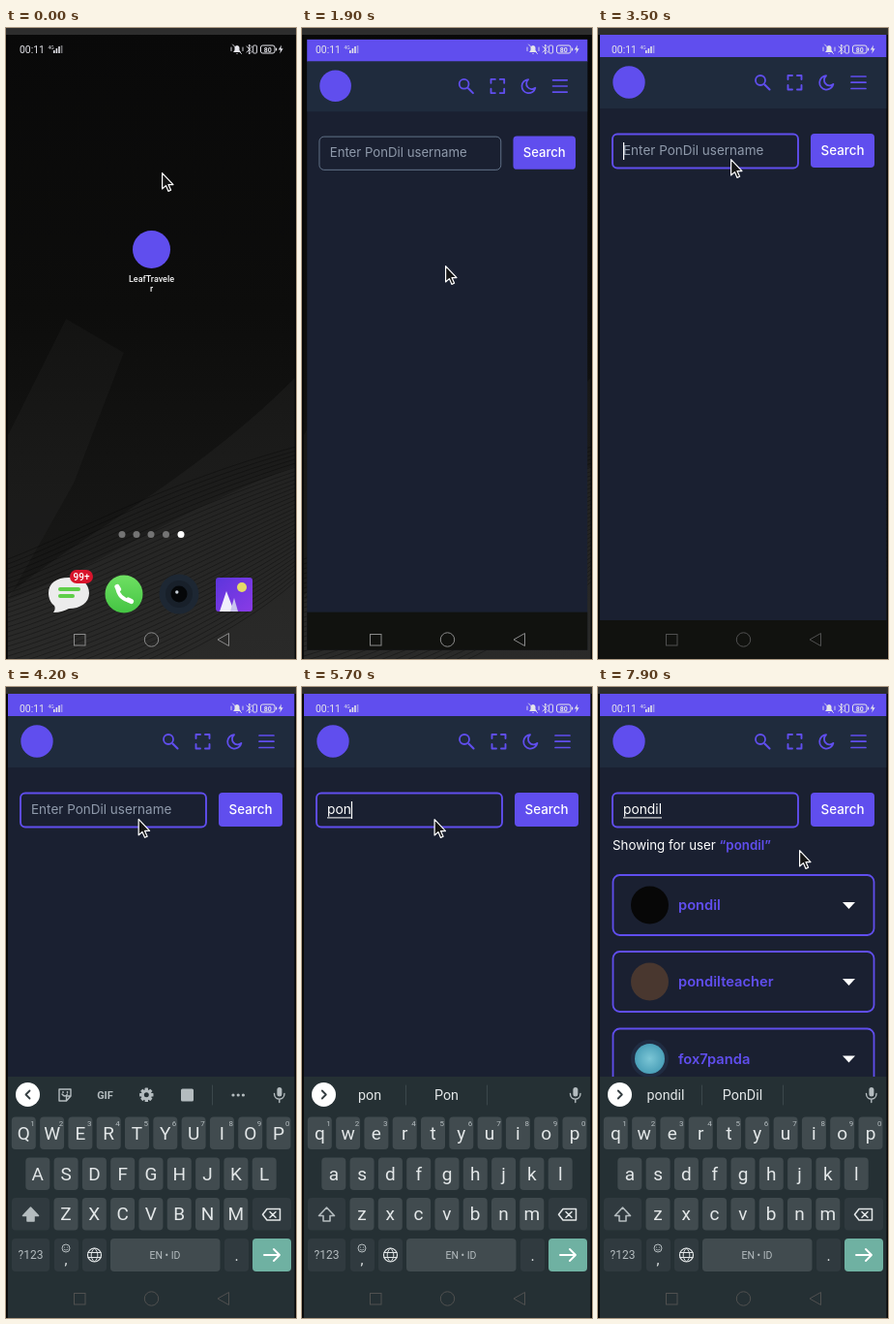
These frames come from a looping animation (300x651 px, 8000 ms). An HTML page:

```html
<!DOCTYPE html>
<html lang="en">
<head>
<meta charset="utf-8">
<title>Phone search</title>
<style>
html, body { margin: 0; width: 100%; height: 100%; overflow: hidden; background: #050505; }
svg { display: block; width: 300px; height: 651px; }
text { font-family: Roboto, sans-serif; white-space: pre; }
.app text { font-family: Inter, sans-serif; }
.line { fill: none; stroke-linecap: round; stroke-linejoin: round; }
</style>
</head>
<body>
<svg id="stage" viewBox="0 0 300 651" xmlns="http://www.w3.org/2000/svg"></svg>
<script>
const LOOP = 8000, STEP = 100;
const PURPLE = '#604eee', WORD = 'pondil', BRAND = 'PonDil';
const typedAt = [4800, 5000, 5300, 5900, 6100, 6300];
const FOCUS = 3500, SUBMIT = 6500, LOADED = 7400;
// time, x, y of the pointer tip
const pointer = [
  [0, 161, 149], [300, 161, 149], [400, 161, 154], [500, 161, 154],
  [600, 167, 185], [700, 177, 236], [800, 170, 274], [900, 157, 287],
  [1000, 157, 287], [1100, 153, 268], [1200, 145, 249], [1300, 148, 245],
  [2400, 148, 245], [2800, 132, 185], [3200, 137, 135], [3600, 137, 135],
  [4300, 136.5, 136], [7300, 136.5, 136], [7700, 204, 162], [7800, 208, 168], [8000, 208, 168]
];

const stage = document.getElementById('stage');
const $ = id => document.getElementById(id);
const clamp = v => Math.max(0, Math.min(1, v));
const out = (p, n) => 1 - Math.pow(1 - clamp(p), n);
const rect = (x, y, w, h, r, fill, more = '') =>
  `<rect x="${x}" y="${y}" width="${w}" height="${h}" rx="${r}" fill="${fill}" ${more}/>`;
const circle = (x, y, r, fill, more = '') =>
  `<circle cx="${x}" cy="${y}" r="${r}" fill="${fill}" ${more}/>`;
const line = (d, color, w, more = '') =>
  `<path class="line" d="${d}" stroke="${color}" stroke-width="${w}" ${more}/>`;
const shape = (d, fill, more = '') => `<path d="${d}" fill="${fill}" ${more}/>`;
const text = (x, y, size, str, fill, more = '') =>
  `<text x="${x}" y="${y}" font-size="${size}" fill="${fill}" ${more}>${str}</text>`;
const mid = 'text-anchor="middle"';
const bold = 'font-weight="600"';

function wallpaper() {
  let s = rect(0, 0, 300, 651, 0, 'url(#wall)');
  s += shape('M2 420L62 300L122 335L70 470L2 590Z', '#fff', 'opacity=".025"');
  s += shape('M2 585C80 520 190 470 300 360V651H2Z', '#fff', 'opacity=".035"');
  s += shape('M2 590C90 560 170 500 300 452V651H2Z', '#fff', 'opacity=".03"');
  for (let i = 0; i < 34; i++) {
    s += line(`M2 ${548 + i * 5}C${70 + i} ${522 + i * 5} ${160 + i * 2} ${470 + i * 5} 300 ${432 + i * 4.2}`,
      '#000', .8, 'opacity=".38"');
  }
  return s;
}

function home() {
  let s = wallpaper();
  s += circle(150.5, 228.5, 19.5, PURPLE);
  s += text(150.5, 262, 9, 'LeafTravele', '#f4f4f4', mid + ' font-weight="500"');
  s += text(150.5, 272, 9, 'r', '#f4f4f4', mid + ' font-weight="500"');
  [120, 135, 150, 165.5, 181].forEach((x, i) => s += circle(x, 522.5, 3.5, i < 4 ? '#747474' : '#fff'));
  // messages
  s += shape('M65 567C78 567 86 573 86 583C86 593 77 599 65 599C61 601 56 603 49 603C51 600 51 598 50 596C46 593 44 588 44 583C44 573 52 567 65 567Z', '#ececec');
  s += line('M56 579H75M56 586H69', '#5fce48', 4);
  s += rect(66, 559, 24, 14, 7, '#d9142c') + text(78, 569.7, 10, '99+', '#fff', mid + ' font-weight="500"');
  // phone
  s += circle(122, 584, 19.5, 'url(#call)');
  s += line('M115 577C116 585 121 590 129 591', '#fff', 3.6);
  s += line('M115 576.5L116.5 579M126.5 590L129.5 591.5', '#fff', 5.2);
  // camera
  s += circle(179, 584, 20.5, '#1d2733') + circle(179, 584, 14, '#18202a') + circle(179, 584, 8.5, '#050709');
  s += circle(176.8, 582, 1.7, '#c8d0d8');
  // gallery
  s += rect(217, 567, 38, 35, 3, 'url(#pic)') + circle(244, 577, 5, '#e4db68');
  s += shape('M221 602L228 581L236 602Z', '#f0eefb') + shape('M232 602L236 588L240 602Z', '#c9c3ee');
  return s;
}

function card(y, name, face) {
  return rect(15.5, y, 270, 62, 7, 'none', `stroke="${PURPLE}" stroke-width="1.8"`) + face +
    text(83, y + 36, 14.7, name, PURPLE, bold) +
    shape(`M253 ${y + 28}H266L259.5 ${y + 35}Z`, '#fff');
}

function app() {
  let s = rect(2, 7, 296.5, 644, 0, '#1a2031');
  s += rect(2, 7, 296.5, 23.5, 0, PURPLE) + rect(2, 30, 296.5, 53, 0, '#1f2b3d');
  s += circle(32, 56, 16.7, PURPLE);
  s += line('M172.5 58.5L177.5 63.5', PURPLE, 2.1) + circle(168, 54, 5, 'none', `stroke="${PURPLE}" stroke-width="1.8"`);
  s += line('M196.5 53V49H201M206 49H210.5V53M210.5 59V63.5H206M201 63.5H196.5V59', PURPLE, 1.9);
  s += line('M236 49.2A7.2 7.2 0 1 0 243.4 58A5.6 5.6 0 0 1 236 49.2Z', PURPLE, 1.8);
  s += line('M262 50H277M262 56.2H277M262 62.5H277', PURPLE, 1.7);
  s += rect(15, 109.5, 192, 35, 5, '#1a2031', 'id="field"');
  s += text(26, 131.3, 13.5, `Enter ${BRAND} username`, '#8f9aab', 'id="hint"');
  s += text(26, 131.3, 13.8, '', '#fff', 'id="typed"');
  s += rect(26, 134.4, 0, 1, 0, '#fff', 'id="under"') + rect(26, 118, 1.2, 18, 0, '#fff', 'id="caret"');
  s += rect(220, 109, 66, 35, 4, PURPLE) + text(253, 131.3, 13.4, 'Search', '#fff', mid + ' font-weight="500"');
  s += `<g id="status">` + text(15, 168.3, 13.3,
    `Showing for user <tspan fill="${PURPLE}" font-weight="600">“${WORD}”</tspan>`, '#fff') + '</g>';
  s += '<g id="loading">' + line('M162.7 248.3A18 18 0 1 0 162.7 273.7', PURPLE, 3.6,
    'id="spin" style="stroke-linecap:butt"') + text(150.5, 311, 15.6, 'loading...', '#fff', mid) + '</g>';
  s += '<g id="results">';
  s += card(194, WORD, circle(53.5, 225, 19.5, '#070707'));
  s += card(273, WORD + 'teacher', circle(53.5, 304, 19.5, '#49372f'));
  s += card(352.5, 'fox7panda', circle(53.5, 383.5, 19.5, '#202c42') + circle(53.5, 383.5, 15.5, 'url(#ball)'));
  s += '</g>' + rect(2, 611, 296.5, 40, 0, '#11120f');
  return s;
}

const KEY = '#414b4f', DARK = '#303a3f', INK = '#e3e7e8', SOFT = '#b4bcbf';

function keyRow(chars, x0, y) {
  return [...chars].map((c, i) => {
    const x = x0 + i * 29.3;
    return rect(x - 12.5, y, 25, 33.5, 4, KEY) +
      text(x, y + 23.4, 19, c, INK, mid + ` class="key" data-c="${c}"`);
  }).join('');
}

function keyboard() {
  let s = rect(2, 402, 296.5, 260, 0, '#253034');
  s += keyRow('qwertyuiop', 18.3, 443.5) + keyRow('asdfghjkl', 32.8, 485.5) + keyRow('zxcvbnm', 62, 527);
  for (let i = 0; i < 10; i++) s += text(27.6 + i * 29.3, 453, 8, (i + 1) % 10, SOFT, mid);
  s += rect(6, 527, 39, 33.5, 4, DARK) + line('M25.5 537L33.5 545.5H29V551H22V545.5H17.5Z', SOFT, 1.6, 'id="shift"');
  s += rect(255, 527, 40, 33.5, 4, DARK);
  s += line('M270 538.5H283.5V550H270L265.5 544.2ZM273 541.5L279 547.2M279 541.5L273 547.2', INK, 1.5);
  s += rect(6, 569, 39, 34, 4, DARK) + text(25.5, 590, 12, '?123', SOFT, mid);
  s += rect(50, 569, 25, 34, 4, DARK) + circle(62, 579, 4, 'none', `stroke="${SOFT}"`);
  s += circle(60.5, 578, .6, SOFT) + circle(63.5, 578, .6, SOFT) + line('M60 580.4Q62 582 64 580.4', SOFT, .8);
  s += text(62, 596, 15, ',', INK, mid);
  s += rect(79, 569, 25, 34, 4, DARK) + circle(91.5, 586, 7, 'none', `stroke="${INK}" stroke-width="1.2"`);
  s += line('M85 583.5H98M85 588.5H98M91.5 579C87 583 87 589 91.5 593C96 589 96 583 91.5 579', INK, 1);
  s += rect(108, 569, 113.5, 34, 4, KEY) + text(164.5, 590, 10.5, 'EN • ID', SOFT, mid);
  s += rect(226, 569, 25, 34, 4, DARK) + text(238.5, 592, 16, '.', INK, mid);
  s += rect(255, 569, 40, 34, 4, '#6fb1a2') + line('M267 586H283M277 580L283 586L277 592', '#fff', 1.9);
  s += circle(22.5, 420.5, 12.5, '#fff') + line('', '#333c40', 1.8, 'id="chev"');
  // microphone
  s += rect(280.4, 413, 5, 9.5, 2.5, SOFT) + line('M277.5 419.5C277.5 427 288 427 288 419.5M282.8 425.5V428.5', SOFT, 1.4);
  s += '<g id="tools">';
  s += line('M55 415H67V422L62.5 427H55ZM67 422H62.5V427M58 420Q61 424 63.5 420', SOFT, 1.4);
  s += circle(59, 418, .9, SOFT) + circle(63.5, 418, .9, SOFT);
  s += text(102.5, 424.5, 11, 'GIF', SOFT, mid + ' font-weight="700"');
  for (let a = 0; a < 360; a += 45) s += rect(143.6, 413.6, 3.4, 4, .6, SOFT, `transform="rotate(${a} 145.3 420.8)"`);
  s += circle(145.3, 420.8, 4, 'none', `stroke="${SOFT}" stroke-width="3"`);
  s += rect(181, 414.5, 13, 13, 1.5, SOFT) + line('M213.5 411V431', '#3b474b', 1);
  [235, 240.2, 245.4].forEach(x => s += circle(x, 421, 1.6, SOFT));
  s += '</g><g id="words">' + text(70, 426, 14.3, '', INK, mid + ' id="low"') + text(149.5, 426, 14.3, '', INK, mid + ' id="high"');
  s += line('M107.5 411V431M191.5 411V431', '#3b474b', 1) + '</g>';
  return s;
}

function system() {
  const c = '#e4e4ea';
  let s = text(14, 25.7, 10.4, '00:11', c);
  s += text(43.5, 21.5, 5, '4G', c);
  [3, 5, 7, 8].forEach((h, i) => s += rect(49 + i * 2.6, 26 - h, 1.6, h, 0, c, i > 2 ? 'opacity=".5"' : ''));
  s += shape('M235 25H243L241.5 23V20.5C241.5 17 236.5 17 236.5 20.5V23ZM238 26H240L239 27Z', c);
  s += line('M234.5 17L243.5 26.5M233 20V23.5M245 20V23.5', c, .9);
  s += line('M249 19L254 24.5L251.5 27V17L254 19.5L249 25', c, .9);
  s += rect(255.5, 18, 4, 8, 1, 'none', `stroke="${c}" stroke-width=".9"`);
  s += rect(263.5, 18, 14.5, 8, 2, 'none', `stroke="${c}" stroke-width="1"`) + rect(279, 20.5, 1.2, 3, .5, c);
  s += text(270.8, 24.7, 7, '80', c, mid + ' font-weight="700"');
  s += shape('M285 17.5L281.8 22.5H284L283.3 26.5L286.6 21.3H284.4Z', c);
  s += '<g id="nav" fill="none" stroke="#8a8a8a" stroke-width="1"><rect x="70.5" y="625.5" width="11.5" height="11.5"/>' +
    '<circle cx="150.5" cy="631" r="7.2"/><path d="M230.5 624.5V637.5L219 631Z"/></g>';
  return s;
}

const fade = (id, kind, attrs, stops) => `<${kind}Gradient id="${id}" ${attrs}>` +
  stops.map(([o, c]) => `<stop offset="${o}" stop-color="${c}"/>`).join('') + `</${kind}Gradient>`;

stage.innerHTML = '<defs>' +
  fade('wall', 'linear', 'x1="0" y1="0" x2="0" y2="1"', [[0, '#090909'], [.45, '#0d0d0c'], [.75, '#151514'], [1, '#1b1b1a']]) +
  fade('call', 'linear', 'x1="0" y1="0" x2="0" y2="1"', [[0, '#6fe063'], [1, '#44c443']]) +
  fade('pic', 'linear', 'x1="0" y1="0" x2="1" y2="1"', [[0, '#5c35dc'], [1, '#8a3be6']]) +
  fade('ball', 'radial', '', [[0, '#7cc6d6'], [1, '#4a9fb8']]) + '</defs>' +
  home() + `<g class="app" id="app">${app()}</g><g id="board">${keyboard()}</g>` +
  rect(0, 0, 300, 7, 0, '#2d2d2d') + rect(0, 7, 1.6, 644, 0, '#050505') + rect(298.6, 7, 1.4, 644, 0, '#080808') +
  system() +
  '<path id="mouse" d="M.6 .6V17L4.4 13.6L7 19.4L9.6 18.3L7 12.6H12Z" fill="#161616" stroke="#fff" stroke-width="1.2" stroke-linejoin="round"/>';

const set = (id, attrs) => { for (const k in attrs) $(id).setAttribute(k, attrs[k]); };
const show = (id, on) => set(id, { visibility: on ? 'inherit' : 'hidden' });
const keys = [...document.querySelectorAll('.key')];

function pointerAt(t) {
  const i = Math.max(1, pointer.findIndex(p => p[0] > t));
  const [a, b] = [pointer[i - 1], pointer[i]];
  const p = (t - a[0]) / (b[0] - a[0]);
  return [a[1] + (b[1] - a[1]) * p, a[2] + (b[2] - a[2]) * p];
}

function draw(ms) {
  const t = Math.floor(ms / STEP) * STEP;

  // app grows out of its icon
  const s = .3 + .7 * out((t - 1700) / 400, 5);
  set('app', { transform: `translate(150 229) scale(${s}) translate(-150 -229)`, opacity: clamp((t - 1700) / 130) });
  show('app', t > 1700);
  const g = Math.round(138 - 58 * clamp((t - 2400) / 300));
  set('nav', { stroke: `rgb(${g},${g},${g})` });

  const focused = t >= FOCUS;
  set('field', { stroke: focused ? PURPLE : '#64748b', 'stroke-width': focused ? 1.9 : 1 });

  const count = typedAt.filter(a => t >= a).length;
  const part = WORD.slice(0, count);
  $('typed').textContent = part;
  show('hint', !count);
  const w = count ? $('typed').getComputedTextLength() : 0;
  set('under', { width: t >= 4900 ? w : 0 });
  set('caret', { x: 26 + w });
  const last = count ? typedAt[count - 1] : FOCUS;
  show('caret', focused && Math.floor((t - last) / 530) % 2 === 0);

  show('board', t >= 3700);
  set('board', { transform: `translate(0 ${249 * (1 - out((t - 3600) / 600, 3))})` });
  const upper = t < 4900;
  keys.forEach(k => k.textContent = upper ? k.dataset.c.toUpperCase() : k.dataset.c);
  set('shift', { style: `fill:${upper ? SOFT : 'none'}` });
  show('tools', upper);
  show('words', !upper);
  set('chev', { d: upper ? 'M24.5 416.5L20.5 420.5L24.5 424.5' : 'M20.8 416.5L24.8 420.5L20.8 424.5' });
  $('low').textContent = part;
  $('high').textContent = BRAND.slice(0, count);

  show('status', t >= SUBMIT);
  show('loading', t >= SUBMIT && t < LOADED);
  show('results', t >= LOADED);
  set('spin', { transform: `rotate(${(t - 6700) * .36} 150 261)` });

  set('mouse', { transform: `translate(${pointerAt(t).join(' ')})` });
}

const start = performance.now();
function tick() {
  draw((performance.now() - start) % LOOP);
  requestAnimationFrame(tick);
}
tick();
</script>
</body>
</html>
```
